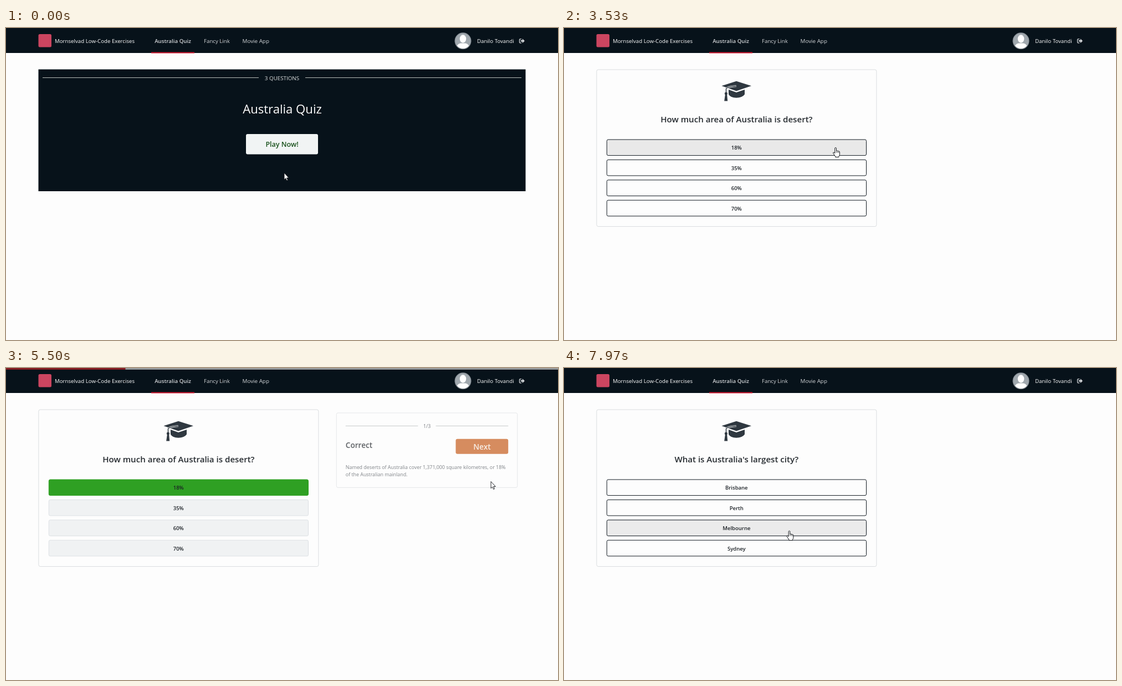
Recreate the animation shown at these times as an HTML page. Size 996 by 562 pixels, loop 8000 ms.

```html
<!DOCTYPE html>
<html lang="en">
<head>
<meta charset="utf-8">
<title>Quiz app</title>
<style>
  html, body { margin: 0; width: 100%; height: 100%; overflow: hidden; background: #fdfdfd; }
  svg { display: block; width: 100vw; height: 100vh; font-family: "Open Sans", "Noto Sans", sans-serif; }
</style>
</head>
<body>
<svg id="stage" viewBox="0 0 996 562"></svg>
<script>
const LOOP = 8000, DARK = '#07121a', INK = '#262b30';
const PAGE = 2600, ANSWERED = 5230, SECOND = 6950;
const CLICKS = [[2250, PAGE], [4850, ANSWERED], [6600, SECOND]];
const QUESTIONS = [
  ['How much area of Australia is desert?', '18%', '35%', '60%', '70%'],
  ["What is Australia's largest city?", 'Brisbane', 'Perth', 'Melbourne', 'Sydney']
];
// Pointer stops: time, x, y
const STOPS = [
  [1000, 502, 261], [1500, 506.5, 211], [3400, 506.5, 211], [4000, 372, 244], [4130, 372, 244],
  [4330, 361.5, 213], [4950, 361.5, 213], [5480, 875, 204.5], [5700, 875, 204.5],
  [6200, 867, 142], [7250, 867, 142], [7900, 406.5, 293]
];
// Spans in which the pointer is over something clickable
const HANDS = [[1300, 5167], [6055, SECOND], [7663, 7734], [7760, LOOP]];
// Answer hovers: row, from, to
const HOVERS = [[0, PAGE, 3772], [1, 3772, 4208], [0, 4208, 5167], [1, 7663, 7734], [2, 7760, LOOP + 500]];

const text = (s, x, y, size, fill, weight = 400, anchor = 'start', id = '') =>
  `<text ${id && `id="${id}"`} x="${x}" y="${y}" font-size="${size}" fill="${fill}" font-weight="${weight}" text-anchor="${anchor}">${s}</text>`;
const rect = (x, y, w, h, fill, extra = '') =>
  `<rect x="${x}" y="${y}" width="${w}" height="${h}" fill="${fill}" ${extra}/>`;
const rule = (x1, x2, y, color) => `<path d="M${x1} ${y}H${x2}" stroke="${color}"/>`;

const header = rect(0, 0, 996, 45, DARK) +
  rect(58.5, 11, 23.5, 23.5, '#cb4560', 'rx="2.5"') +
  text('Mornselvad Low-Code Exercises', 88, 27, 9.7, '#fff') +
  text('Australia Quiz', 301, 27, 9.75, '#d2d5d8', 600, 'middle') +
  text('Fancy Link', 357, 27, 9.7, '#d2d5d8') +
  text('Movie App', 426.5, 27, 9.85, '#d2d5d8') +
  rect(262, 43.5, 78, 2, '#c8132b') +
  `<clipPath id="face"><circle cx="824.5" cy="23.3" r="13.6"/></clipPath>
   <circle cx="824.5" cy="23.3" r="15" fill="#868e95"/>
   <circle cx="824.5" cy="23.3" r="13.8" fill="#a0a8ae"/>
   <g clip-path="url(#face)" fill="#fff"><ellipse cx="824.5" cy="19.5" rx="5.8" ry="7.2"/>
   <path d="M812 38q1-9 8-10.500h9q7 1.500 8 10.500z"/></g>` +
  text('Danilo Tovandi', 850, 27, 9.7, '#fff') +
  `<path d="M930 19.800h-2.500q-1 0-1 1v5q0 1 1 1h2.500" fill="none" stroke="#d2d5d8" stroke-width="1.300"/>
   <path d="M928.700 22h3v-2.700l4.200 4-4.200 4v-2.700h-3z" fill="#d2d5d8"/>`;

const start = `<g id="start">` + rect(58.5, 74.5, 879, 219.5, DARK) +
  rule(66, 456, 89.5, '#b7bdb9') + rule(540, 930, 89.5, '#b7bdb9') +
  text('3 QUESTIONS', 498, 93.6, 9.8, '#dfe2e2', 400, 'middle') +
  text('Australia Quiz', 498.5, 154, 22.1, '#fff', 400, 'middle') +
  rect(433, 191, 130, 36.5, '#f1f4f4', 'rx="3" id="play"') +
  text('Play Now!', 498, 214.3, 12.5, '#17501a', 600, 'middle') + `</g>`;

const rows = [0, 1, 2, 3].map(i => {
  const y = 201 + i * 36.4;
  return rect(77.3, y, 468.2, 28.6, '#fff', `rx="2.500" id="row${i}"`) +
    text('', 311.3, y + 18.4, 9.5, '#1c2126', 600, 'middle', 'answer' + i);
}).join('');

const quiz = `<g id="quiz">` +
  rect(58.9, 75, 505, 282.5, '#fdfdfd', 'rx="3" stroke="#dadde0"') +
  `<g fill="#2f3840"><path d="M284.500 104.300L311 95.700l27 8.600-27 9.200z"/>
   <path d="M297 111l14 5 15-5v8.500q-4 6-15 6.300-11-.3-14-6.300z"/>
   <path d="M311 104.500q-17 1.500-18.500 5v8" fill="none" stroke="#fdfdfd" stroke-width="3"/>
   <path d="M311 104.500q-17 1.500-18.500 5v8" fill="none" stroke="#2f3840" stroke-width="1.500"/>
   <circle cx="292.400" cy="118" r="2.500"/><path d="M291 119h3l1.200 12.500h-6z"/></g>` +
  text('', 311.3, 169.5, 15.1, INK, 600, 'middle', 'question') + rows + `</g>`;

const panel = `<g id="panel">` +
  rect(582, 75, 355, 146.2, '#fdfdfd', 'rx="3" stroke="#dadde0"') +
  rule(600, 742, 100.5, '#aeb2b4') + rule(777, 919, 100.5, '#aeb2b4') +
  text('1/3', 759.7, 104, 9.5, '#4c5157', 400, 'middle') +
  text('Correct', 600, 144, 14.8, INK, 600) +
  rect(816, 126, 103, 29.3, '#c66223', 'rx="3.500" id="next"') +
  text('Next', 867.7, 147.2, 15, '#f6e9df', 600, 'middle') +
  text('Named deserts of Australia cover 1,371,000 square kilometres, or 18%', 600, 184.5, 9.65, '#555a60') +
  text('of the Australian mainland.', 600, 199.6, 9.65, '#555a60') + `</g>`;

const bar = `<g id="bar">` + rect(0, 0, 996, 3, '#e6e6e6') + rect(0, 0, 0, 3, '#cc2229', 'id="fill"') + `</g>`;

const pointer = `<g id="pointer" fill="#fff" stroke="#101418" stroke-linejoin="round">
  <path id="arrow" stroke-width=".9" d="M0 0v12.200l2.700-2.500 1.900 4.300 1.900-.8-1.900-4.200h3.700z"/>
  <g id="hand"><path d="M-1.300 1.200q1.300-1.800 2.600 0v5q1.200-.9 2.200.4 1.300-.8 2.100.5 1.600-.4 1.700 1.200v4.200q-.2 2.500-1.500 3.700v1.300h-6.300v-1.300l-3.900-5.700q-.4-1.800 1.400-1.500l1.700 1.600z"/>
  <path d="M1.300 6.500v3.200M3.500 7v2.800M5.600 7.500v2.500" fill="none" stroke-width=".7"/></g></g>`;

document.getElementById('stage').innerHTML = header + start + quiz + panel + bar + pointer;

const el = id => document.getElementById(id);
const show = (id, on) => el(id).setAttribute('display', on ? 'inline' : 'none');
const set = (id, attrs) => { for (const k in attrs) el(id).setAttribute(k, attrs[k]); };
const ramp = (t, from, dur) => Math.min(1, Math.max(0, (t - from) / dur));
const smooth = u => u * u * (3 - 2 * u);
const mix = (a, b, u) => `rgb(${a.map((v, i) => Math.round(v + (b[i] - v) * u))})`;

function pointerAt(t) {
  let [, x, y] = STOPS[0];
  for (let i = 1; i < STOPS.length; i++) {
    const [t0, x0, y0] = STOPS[i - 1], [t1, x1, y1] = STOPS[i];
    if (t < t0) break;
    const u = smooth(ramp(t, t0, t1 - t0));
    x = x0 + (x1 - x0) * u;
    y = y0 + (y1 - y0) * u;
  }
  return [x, y];
}

function drawRows(t) {
  const answered = t >= ANSWERED && t < SECOND;
  const words = QUESTIONS[t < SECOND ? 0 : 1];
  el('question').textContent = words[0];
  for (let i = 0; i < 4; i++) {
    const hover = HOVERS.filter(h => h[0] === i)
      .reduce((sum, [, a, b]) => sum + ramp(t, a, 230) - ramp(t, b, 230), 0);
    el('answer' + i).textContent = words[i + 1];
    const right = answered && i === 0;
    set('row' + i, {
      fill: right ? '#2fa023' : answered ? '#f0f2f3' : mix([253, 253, 253], [233, 233, 233], Math.min(1, hover)),
      stroke: right ? '#2fa023' : answered ? '#dde1e4' : '#121a22'
    });
  }
}

function drawBar(t) {
  const load = CLICKS.find(([a, b]) => t >= a && t < b + 600);
  show('bar', load);
  if (!load) return;
  const [from, done] = load;
  set('bar', { opacity: ramp(t, from, 120) * (1 - ramp(t, done + 90, 500)) });
  set('fill', { width: (t - from) * 0.331 });
}

function draw(t) {
  show('start', t < PAGE);
  show('quiz', t >= PAGE);
  set('play', { fill: mix([241, 244, 244], [203, 207, 207], ramp(t, 1300, 230)) });
  drawRows(t);

  show('panel', t >= ANSWERED && t < SECOND);
  const p = ramp(t, ANSWERED, 370), scale = 0.7 + 0.3 * p;
  set('panel', { opacity: p, transform: `translate(759.500 148.100) scale(${scale}) translate(-759.500 -148.100)` });
  set('next', { fill: mix([200, 100, 38], [193, 93, 31], ramp(t, 6055, 200)) });

  drawBar(t);
  const hand = HANDS.some(([a, b]) => t >= a && t < b);
  show('hand', hand);
  show('arrow', !hand);
  set('pointer', { transform: `translate(${pointerAt(t)})` });
}

const begin = performance.now();
function tick() {
  draw((performance.now() - begin) % LOOP);
  requestAnimationFrame(tick);
}
tick();
</script>
</body>
</html>
```
